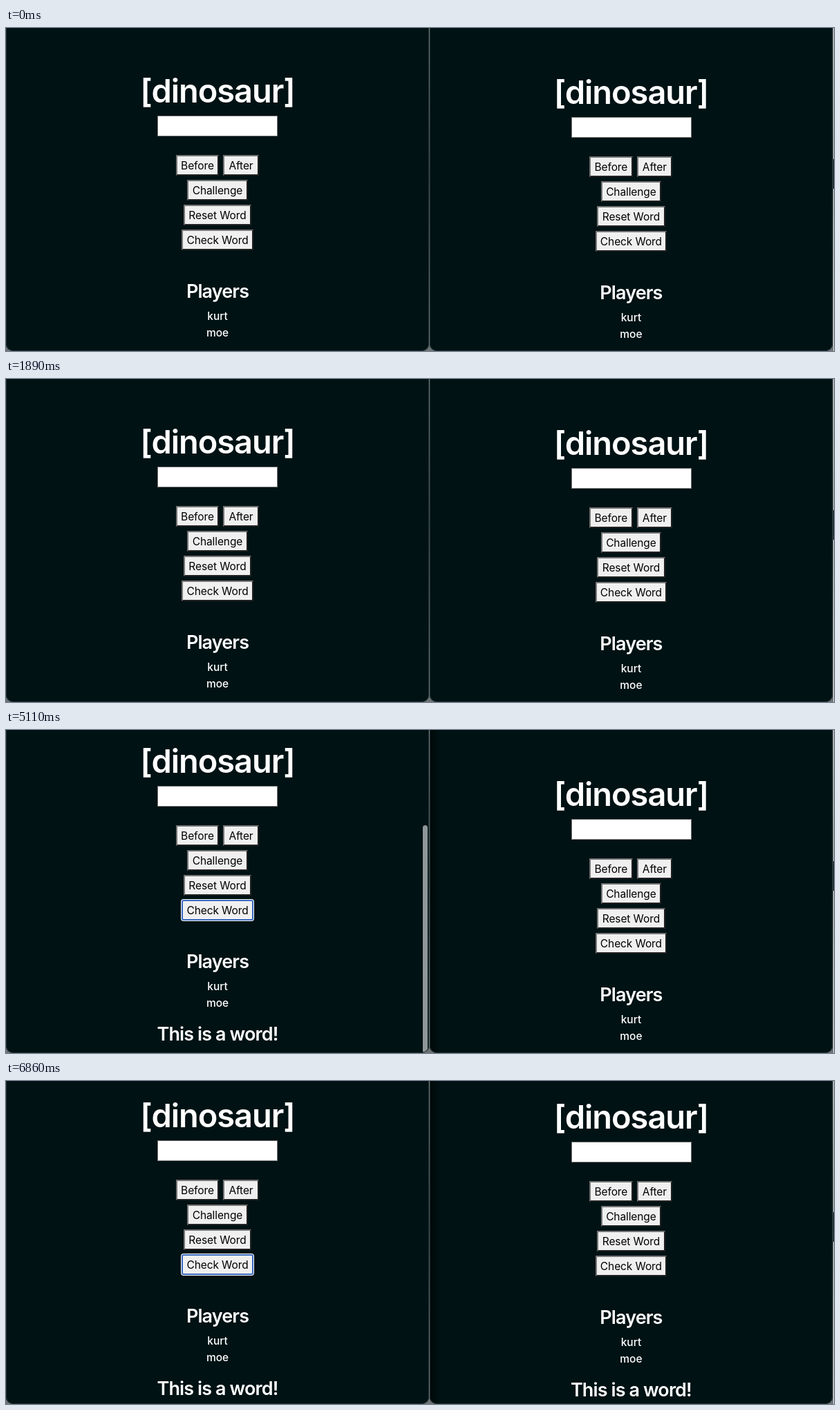
Animation of 1198 by 468 pixels, one loop 6.93 s. Source, as an HTML page:

```html
<!DOCTYPE html>
<html lang="en">
<head>
<meta charset="utf-8">
<title>Word game</title>
<style>
html, body { margin: 0; width: 100%; height: 100%; overflow: hidden; }
body {
  position: relative;
  background: linear-gradient(#6a7173, #3c4547 45%, #6d7375);
  font: 500 15.5px Inter, "Noto Sans", sans-serif;
  font-optical-sizing: none;
  color: #fff;
}
.win {
  position: absolute; top: 0; height: 468px; overflow: hidden;
  background: #001214; border-radius: 0 0 10px 10px;
}
#left { left: 0; width: 612px; }
#right { left: 613px; width: 583px; }
.win::after {
  content: ""; position: absolute; inset: -2px 0 0; border-radius: inherit;
  box-shadow: inset 0 0 0 1px #1c2f31;
}
.page { position: absolute; width: 612px; height: 520px; }
.text {
  position: absolute; left: 0; width: 612px;
  line-height: 0; text-align: center; white-space: nowrap;
}
.title { font-size: 47px; font-weight: 600; letter-spacing: -1.05px; }
.head { font-size: 27px; font-weight: 600; letter-spacing: -.9px; }
.field, .btn { position: absolute; box-sizing: border-box; height: 30px; }
.field { left: 219.2px; top: 127px; width: 174px; background: #fff; border: 1px solid #767676; }
.btn {
  display: flex; align-items: center; justify-content: center;
  background: #f0f0f0; border: 2px outset #767676;
  color: #000; font-weight: 400; letter-spacing: -.1px; white-space: nowrap;
}
.btn.focus { border: 2px solid #3a6ac0; border-radius: 3px; box-shadow: 0 0 0 1px #fff; }
.bar { position: absolute; height: 330px; background: #8f9798; border-radius: 6px; }
#left .bar { left: 603px; width: 7px; }
#right .bar { left: 570px; width: 11px; }
#shade {
  position: absolute; left: 0; top: 0; width: 16px; height: 468px;
  background: linear-gradient(90deg, rgba(0,0,0,.6), transparent);
}
#edge {
  position: absolute; left: 1197px; top: 0; width: 1px; height: 468px;
  background: linear-gradient(#d0d4d4 190px, #0a2527 0 233px, #e4e6e6 0);
}
</style>
</head>
<body>
<div class="win" id="left"></div>
<div class="win" id="right"></div>
<div id="edge"></div>
<script>
const LOOP = 6930, STEP = 70, LIMIT = 41, FOCUS_AT = 3290, CHECK_AT = 4270;
const ramp = (t, from, to) => Math.min(1, Math.max(0, (t - from) / (to - from)));

// Eased scroll up to a peak, then a rubber-band return to the resting place
function glide(t, start, top, release, end, peak, rest) {
  if (t < release) return peak * (1 - Math.cos(Math.PI * ramp(t, start, top))) / 2;
  return rest + (peak - rest) * (1 - ramp(t, release, end)) ** 2.5;
}
const pulse = (t, show, hide) => ramp(t, show, show + STEP) * (1 - ramp(t, hide, hide + 210));

function add(parent, cls, text = "", style = {}) {
  const el = document.createElement("div");
  el.className = cls;
  el.textContent = text;
  for (const key in style) el.style[key] = style[key] + "px";
  parent.append(el);
  return el;
}

function build(id, dx, dy) {
  const win = document.getElementById(id);
  const page = add(win, "page", "", { left: dx });
  const label = (cls, text, y) => add(page, "text " + cls, text, { top: y });
  const button = (text, row, width, left = 306 - width / 2) =>
    add(page, "btn", text, { left, top: 184 + 36 * row, width });

  label("title", "[dinosaur]", 90.6);
  add(page, "field");
  button("Before", 0, 62.4, 245.8);
  button("After", 0, 51.4, 314.3);
  button("Challenge", 1, 87.4);
  button("Reset Word", 2, 98.4);
  const check = button("Check Word", 3, 103.8);
  label("head", "Players", 381.5);
  label("", "kurt", 417.5);
  label("", "moe", 441.5);
  const verdict = label("head", "This is a word!", 486.5);
  const bar = add(win, "bar");

  return { check, verdict, draw(scroll, alpha) {
    page.style.top = dy - scroll + "px";
    bar.style.top = 100 + Math.min(scroll, LIMIT) * .93 + "px";
    bar.style.opacity = alpha;
  } };
}

const left = build("left", 0, 0);
const right = build("right", -14.6, 2);
const shade = add(document.getElementById("right"), "");
shade.id = "shade";

function frame() {
  const t = Math.floor(performance.now() % LOOP / STEP) * STEP;
  const bounce = glide(t, 840, 1050, 1050, 1890, 8, 0);
  left.draw(bounce + glide(t, CHECK_AT, 4970, 5110, 5740, 46, LIMIT), pulse(t, CHECK_AT, 5530));
  right.draw(glide(t, 5390, 5850, 5850, 6500, 44, LIMIT), pulse(t, 5390, 6510));
  left.check.classList.toggle("focus", t >= FOCUS_AT);
  shade.style.opacity = t >= FOCUS_AT ? 1 : 0;
  for (const side of [left, right]) side.verdict.hidden = t < CHECK_AT;
  requestAnimationFrame(frame);
}
frame();
</script>
</body>
</html>
```
